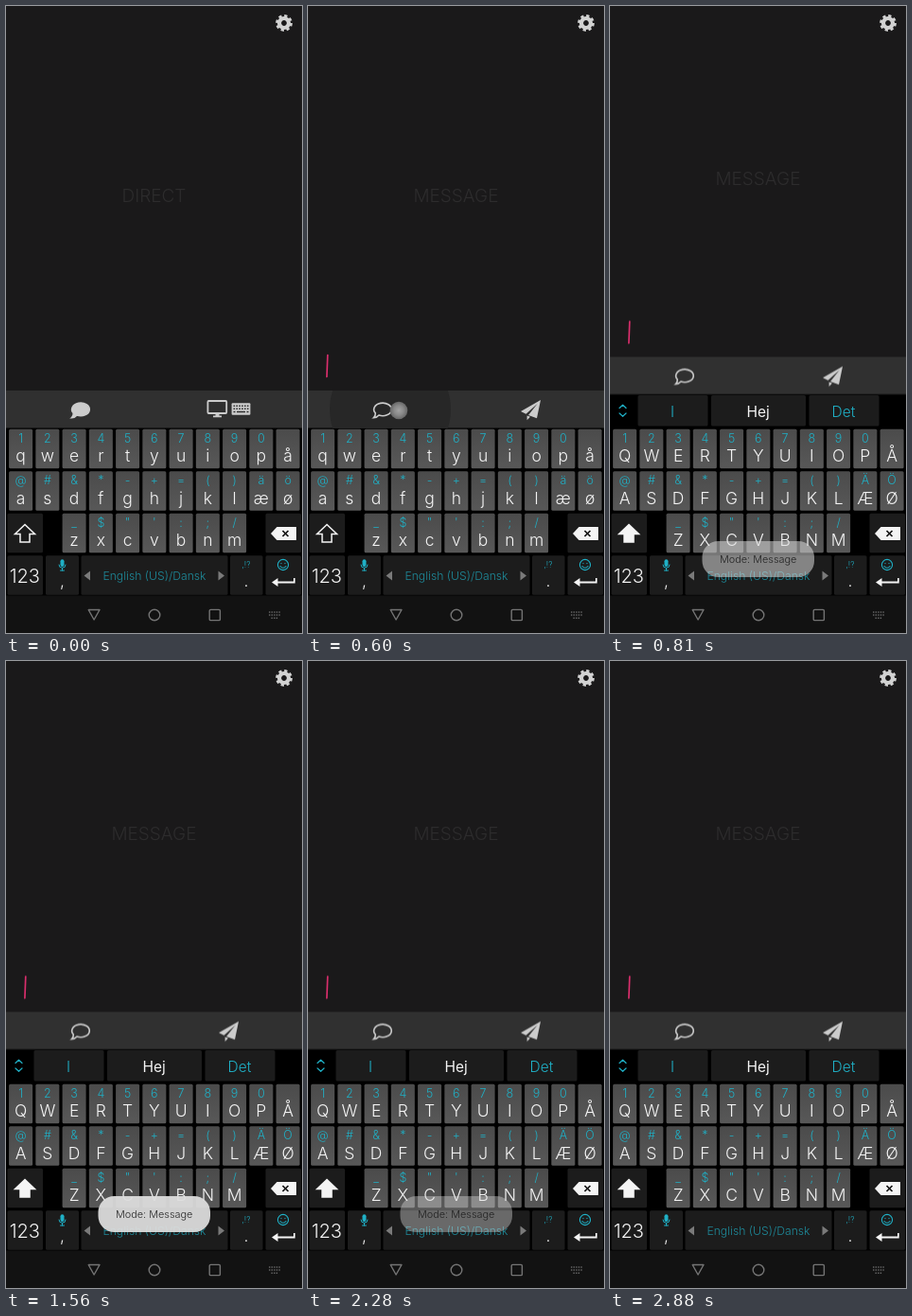
Write an HTML page that moves like this. It is 313 px wide and 662 px high and loops after 3.09 s.

```html
<!DOCTYPE html>
<html lang="en">
<head>
<meta charset="utf-8">
<title>Message mode</title>
<style>
  html, body { margin: 0; width: 100%; height: 100%; overflow: hidden; background: #000; }
  svg { display: block; width: 100%; height: 100%; }
  text { font-family: Inter, "Liberation Sans", sans-serif; font-weight: 300; text-anchor: middle; }
  .teal { fill: #1fb0c6; }
  .white { fill: #f4f4f4; }
  .icon { fill: #ccc; }
  .hint { font-size: 12.5px; }
  .letter { font-size: 17.5px; }
  .label { font-size: 19px; fill: #2d2c2d; }
  .line { fill: none; stroke-linecap: round; stroke-linejoin: round; }

  .direct, .message, .lower, .upper, .bar, .title, .cursor {
    animation: 3090ms step-end infinite;
  }
  /* mode switches at 570 ms, the layout at 690 ms */
  .direct { animation-name: hide-mode; }
  .message { animation-name: show-mode; }
  .lower { animation-name: hide-layout; }
  .upper { animation-name: show-layout; }
  .bar { animation-name: lift-bar; }
  .title { animation-name: lift-title; }
  .cursor { animation-name: blink; }
  .ripple { transform-origin: 87px 426px; animation: ripple 3090ms linear infinite; }
  .touch { animation: touch 3090ms linear infinite; }
  .toast { animation: toast 3090ms linear infinite; }

  @keyframes hide-mode { 0% { opacity: 1 } 18.447%, 100% { opacity: 0 } }
  @keyframes show-mode { 0% { opacity: 0 } 18.447%, 100% { opacity: 1 } }
  @keyframes hide-layout { 0% { opacity: 1 } 22.33%, 100% { opacity: 0 } }
  @keyframes show-layout { 0% { opacity: 0 } 22.33%, 100% { opacity: 1 } }
  @keyframes lift-bar { 0% { transform: none } 22.33%, 100% { transform: translateY(-35.5px) } }
  @keyframes lift-title { 0% { transform: none } 22.33%, 100% { transform: translateY(-18px) } }
  @keyframes blink {
    0%, 13.592%, 30.097%, 54.369%, 78.641% { opacity: 0 }
    1.456%, 18.447%, 42.718%, 66.99%, 87.379%, 100% { opacity: 1 }
  }
  @keyframes ripple {
    0%, 12.621% { transform: scale(.3); opacity: 0 }
    14.5% { transform: scale(.6); opacity: 1 }
    18.447% { transform: scale(1); opacity: 1 }
    19.417% { transform: scale(1); opacity: .95 }
    22.33%, 100% { transform: scale(1); opacity: 0 }
  }
  @keyframes touch {
    0%, 12.3% { opacity: 0 }
    12.621%, 20.388% { opacity: 1 }
    20.5%, 100% { opacity: 0 }
  }
  @keyframes toast {
    0%, 22.33% { opacity: 0 }
    29.126%, 66.99% { opacity: 1 }
    77.67% { opacity: .1 }
    78.641%, 100% { opacity: 0 }
  }
</style>
</head>
<body>
<svg viewBox="0 0 313 662">
  <defs>
    <linearGradient id="key" x2="0" y2="1">
      <stop stop-color="#4b4b4b"/><stop offset="1" stop-color="#585858"/>
    </linearGradient>
    <radialGradient id="dot">
      <stop stop-color="#a2a2a2"/><stop offset=".55" stop-color="#888"/><stop offset="1" stop-color="#666"/>
    </radialGradient>
    <clipPath id="strip"><rect y="406" width="313" height="39.5"/></clipPath>
    <path id="bubble" d="M75 432.1A9.3 6.8 0 1 0 71.3 429.8Q71.5 433 69.4 434.8Q72.8 434.8 75 432.1Z" stroke-width="1.6"/>
    <path id="shift" d="M20 547.5L30.5 557.5H25V566H15V557.5H9.5Z" stroke="#f4f4f4" stroke-width="1.5"/>
  </defs>

  <rect width="313" height="446" fill="#1a191a"/>
  <g transform="translate(294 18)" fill="none" stroke="#d2d2d2">
    <circle r="5" stroke-width="4.2"/>
    <circle r="7.5" stroke-width="2.8" stroke-dasharray="3.2 2.69"/>
  </g>

  <g class="title">
    <text class="label direct" x="156.5" y="207">DIRECT</text>
    <text class="label message" x="156.5" y="207">MESSAGE</text>
  </g>

  <rect y="445" width="313" height="178" fill="#000"/>
  <rect class="upper" y="409" width="313" height="37" fill="#000"/>

  <g class="bar">
    <path class="cursor line" d="M20.8 368.5L19.9 391.5" stroke="#d92e6c" stroke-width="1.7"/>
    <rect y="406" width="313" height="39.5" fill="#303030"/>
    <g clip-path="url(#strip)"><circle class="ripple" cx="87" cy="426" r="64" fill="#272727"/></g>
    <g class="direct">
      <use href="#bubble" fill="#ccc" stroke="#ccc"/>
      <rect x="213.4" y="417" width="19.8" height="13" rx="1" fill="none" stroke="#ccc" stroke-width="1.8"/>
      <path class="icon" d="M221.5 430h4v2.5h2.5v1.7h-9v-1.7h2.5z"/>
      <rect class="icon" x="238.6" y="419.3" width="19.8" height="12.4" rx="1"/>
      <path d="M240.5 422.3h16M240.5 425.3h16" stroke="#303030" stroke-width="1.5" stroke-dasharray="1.6 1.28"/>
      <path d="M240.5 428.6h2M244 428.6h9M254.5 428.6h2" stroke="#303030" stroke-width="1.5"/>
    </g>
    <g class="message">
      <use href="#bubble" fill="none" stroke="#ccc"/>
      <path class="icon" d="M246 416L225 428L230.5 430.7L242.5 420L233 432L242 435.3ZM231.6 432.6V437.2L235 433.8Z"/>
    </g>
    <circle class="touch" cx="96" cy="427" r="9.3" fill="url(#dot)"/>
  </g>

  <g class="upper">
    <path class="line" d="M10 424.5L13.5 421.2L17 424.5M10 430L13.5 433.3L17 430" stroke="#1fb0c6" stroke-width="1.2"/>
    <g fill="#1c1c1c">
      <rect x="29.5" y="411" width="74" height="32.5" rx="1.5"/>
      <rect x="107" y="411" width="100" height="32.5" rx="1.5"/>
      <rect x="210.5" y="411" width="74" height="32.5" rx="1.5"/>
    </g>
    <g font-size="15.5">
      <text class="teal" x="66" y="433.5">I</text>
      <text class="white" x="156.7" y="433.5" style="font-weight:400">Hej</text>
      <text class="teal" x="247" y="433.5">Det</text>
    </g>
  </g>

  <g id="keys"></g>

  <use class="lower" href="#shift" fill="none"/>
  <use class="upper" href="#shift" fill="#f4f4f4"/>
  <path class="white" d="M280 557L286.5 550H307V564H286.5Z"/>
  <path d="M292.5 554l6 6m0-6l-6 6" stroke="#111" stroke-width="1.7"/>

  <text class="white" x="19.8" y="608.5" font-size="20">123</text>
  <g class="line" stroke="#1fb0c6">
    <path d="M59.5 586.3V590" stroke-width="4"/>
    <path d="M56 590Q56 593.3 59.5 593.3T63 590M59.5 593.5V596M57.5 596h4" stroke-width="1"/>
    <circle cx="293" cy="590" r="5.6" stroke-width="1.1"/>
    <path d="M290 591.5Q293 595 296 591.5M291 588.3v.3M295 588.3v.3" stroke-width="1.1"/>
  </g>
  <text class="white letter" x="59.5" y="612.5">,</text>
  <text class="teal" x="157" y="606" font-size="12.2" opacity=".75">English (US)/Dansk</text>
  <path d="M89 596.5V606.5L82.5 601.5ZM224.5 596.5V606.5L231 601.5Z" fill="#7a7a7a"/>
  <text class="teal" x="254" y="593" font-size="8.5">,!?</text>
  <text class="white letter" x="254" y="612.5">.</text>
  <path class="white" d="M281 608.5L287.5 604V607.5H304V604H305.7V609.5H287.5V613Z"/>

  <rect y="622.5" width="313" height="39.5" fill="#121212"/>
  <g class="line" stroke="#757575" stroke-width="1.4">
    <path d="M87.2 637.5H99L93.1 648Z"/>
    <circle cx="157" cy="643" r="5.8"/>
    <rect x="215.2" y="637.4" width="11.2" height="11.2" rx="1.2"/>
  </g>
  <path d="M278 640h12M278 643h12M280.5 646.2h7" stroke="#666" stroke-width="1.4" stroke-dasharray="1.4 1.2"/>

  <g class="toast">
    <rect x="97.5" y="565" width="118.5" height="38" rx="17" fill="#dedede" opacity=".94"/>
    <text x="156.7" y="588" font-size="10.9" fill="#2a2a2a">Mode: Message</text>
  </g>
</svg>

<script>
  const NS = 'http://www.w3.org/2000/svg';
  const keys = document.getElementById('keys');

  function add(tag, attrs, content) {
    const el = document.createElementNS(NS, tag);
    for (const name in attrs) el.setAttribute(name, attrs[name]);
    if (content) el.textContent = content;
    keys.append(el);
  }

  function box(x, y, width, fill) {
    add('rect', { x, y, width, height: 41.5, rx: 1.5, fill });
  }

  // Draws both cases when they differ.
  function glyph(char, x, y, kind) {
    const upper = char.toUpperCase();
    if (char === upper) return add('text', { x, y, class: kind }, char);
    add('text', { x, y, class: kind + ' lower' }, char);
    add('text', { x, y, class: kind + ' upper' }, upper);
  }

  const rows = [
    ['qwertyuiopå', '1234567890', 0],
    ['asdfghjklæø', '@#&*-+=()äö', 0],
    ['zxcvbnm', '_$"\':;/', 2]
  ];
  rows.forEach(([letters, hints, start], row) => {
    const top = 446.7 + row * 44.5;
    [...letters].forEach((char, i) => {
      const x = 15.6 + (start + i) * 28.25;
      box(x - 12.5, top, 25, 'url(#key)');
      if (hints[i]) glyph(hints[i], x, top + 14, 'hint teal');
      glyph(char, x, top + 34.3, 'letter white');
    });
  });

  [[1.5, 37.5], [274.5, 37.5]].forEach(([x, w]) => box(x, 535.7, w, '#1c1c1c'));
  [[1.5, 37.5], [42, 35], [79.5, 155], [237, 34.5], [274.5, 37.5]]
    .forEach(([x, w]) => box(x, 580.2, w, '#1c1c1c'));
</script>
</body>
</html>
```
